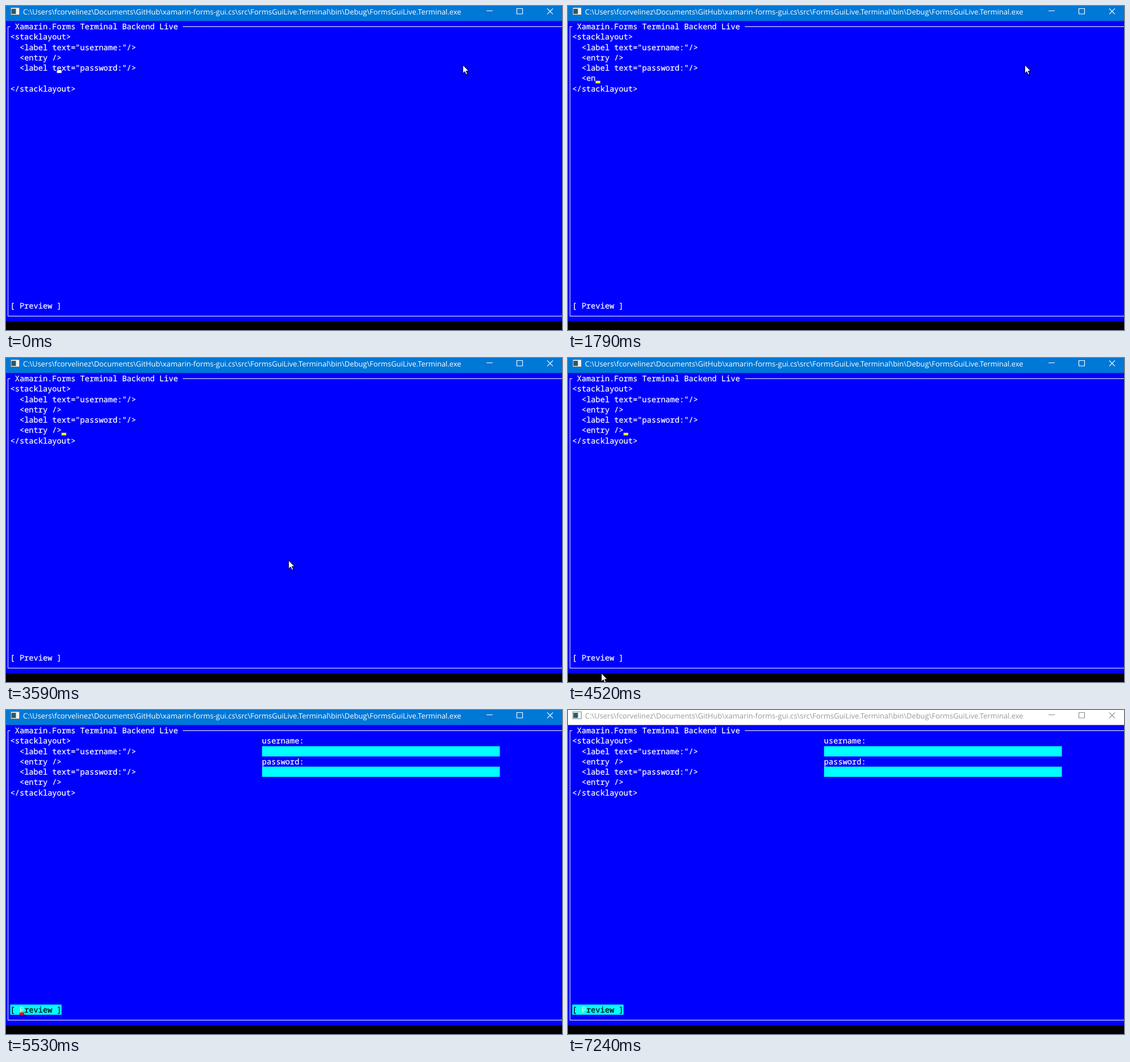
Animation, 979 px wide and 572 px high, one loop 7.96 s. Source, as an HTML page:

```html
<!DOCTYPE html>
<html lang="en">
<head>
<meta charset="utf-8">
<title>Terminal live preview</title>
<style>
  html, body { margin: 0; width: 100%; height: 100%; overflow: hidden; background: #000; }
  svg { display: block; width: 979px; height: 572px; }
  text { white-space: pre; text-rendering: geometricPrecision; }
  .mono { font: 13.68px "Noto Sans Mono", "DejaVu Sans Mono", monospace; stroke-width: .25px; }
  .caption { font: 12.91px "Open Sans", "Noto Sans", sans-serif; }
</style>
</head>
<body>
<svg id="stage" viewBox="0 0 979 572"></svg>
<script>
const LOOP = 7960;
const CELL = 8.21, LINE = 18.27, LEFT = -0.7, TOP = 27;
const colX = col => LEFT + CELL * col;
const rowY = row => TOP + LINE * row;

const stage = document.getElementById('stage');

function add(tag, attrs, parent = stage) {
  const el = document.createElementNS('http://www.w3.org/2000/svg', tag);
  for (const name in attrs) el.setAttribute(name, attrs[name]);
  parent.appendChild(el);
  return el;
}
const rect = (x, y, width, height, fill, parent) => add('rect', { x, y, width, height, fill }, parent);

function print(col, row, string, fill = '#fff', parent = stage) {
  const el = add('text', { x: colX(col), y: rowY(row) + 14, fill, stroke: fill, class: 'mono' }, parent);
  el.textContent = string;
  return el;
}
const cells = (col, row, count, fill, parent) =>
  rect(colX(col), Math.round(rowY(row)), CELL * count, 18, fill, parent);
const show = (el, on) => el.setAttribute('visibility', on ? 'visible' : 'hidden');

// Window caption
const bar = rect(0, 0, 979, 27, '#0078d7');
const icon = add('g', {});
rect(8, 2.5, 16, 13.5, '#7d868c', icon);
rect(9, 3.5, 14, 11.5, '#f4f6f7', icon);
rect(9.5, 5, 8, 9, '#245e68', icon);
const caption = add('text', { x: 30, y: 14.7, class: 'caption' });
caption.textContent = 'C:\\Users\\fcorvelinez\\Documents\\GitHub\\xamarin-forms-gui.cs\\src\\' +
  'FormsGuiLive.Terminal\\bin\\Debug\\FormsGuiLive.Terminal.exe';
const buttons = add('path', {
  d: 'M846 8.5h11M899.5 4.5h10v9.5h-10zM953 4.3l10 10M963 4.3l-10 10', fill: 'none', 'stroke-width': 1.15
});

// Console window and its frame
rect(0, 26.5, 979, 530, '#00f');
rect(3, 36, 1, 512, '#fff');
rect(3, 36, 4.5, 1, '#fff');
rect(colX(38), 36, 979, 1, '#fff');
rect(3, 547, 979, 1, '#fff');
print(2, 0, 'Xamarin.Forms Terminal Backend Live');

// Editor
print(1, 1, '<stacklayout>');
print(3, 2, '<label text="username:"/>');
print(3, 3, '<entry />');
print(3, 4, '<label text="password:"/>');
const typed = print(3, 5, '');
print(1, 6, '</stacklayout>');

// Preview button, plain and focused
const plainButton = print(1, 27, '[ Preview ]');
const focusedButton = add('g', {});
cells(1, 27, 11, '#0ff', focusedButton);
print(1, 27, '[', '#000', focusedButton);
print(3, 27, 'P', '#ffff99', focusedButton);
print(4, 27, 'review ]', '#000', focusedButton);

// Rendered form
const form = add('g', {});
['username:', 'password:'].forEach((label, i) => {
  print(55, 1 + 2 * i, label, '#fff', form);
  cells(55, 2 + 2 * i, 51, '#0ff', form);
});

const caret = rect(0, 0, CELL, 4.5, '#fff');
const pointer = add('path', {
  d: 'M.5 .7V15.3L3.9 12.2 6.2 17.5 8.5 16.5 6.2 11.3H10.7Z',
  fill: '#fff', stroke: '#000', 'stroke-width': .9
});

const NEW_LINE = 620, FOCUS = 4990, RENDER = 5530, BLUR = 7240;
const clamp = u => Math.min(1, Math.max(0, u));
const easeOut = u => 1 - (1 - u) ** 2;

// A slow first key, a quick burst, then a steady finish.
function typedCount(t) {
  const part = (from, to, keys) => Math.floor(clamp((t - from) / (to - from)) * keys);
  return part(0, 1000, 1) + part(1000, 1650, 1) + part(1650, 2020, 4) + part(2020, 2720, 3);
}

// The caret flips between shown and hidden at each of these times.
const blinks = [460, NEW_LINE, 3120, 3590, 5230, RENDER, 5760, 6310, BLUR];
const caretShown = t => blinks.filter(time => time <= t).length % 2 === 0;

function caretCell(t) {
  if (t < NEW_LINE) return [t < 80 ? 11 : 12, 4, '#fff'];
  if (t < FOCUS) return [3 + typedCount(t), 5, '#ff0'];
  return [3, 27, '#f00'];
}

// Each sweep is a quadratic curve: start, control, end.
const sweeps = [
  { from: 3280, to: 3750, x: [804, 611, 461], y: [103.5, 302, 376] },
  { from: 4050, to: 4840, x: [461, 51, 44], y: [376, 531, 574] },
  { from: 6690, to: 7090, x: [806, 868, 926], y: [574, 540, 575] }
];
const SAMPLE = 77;
const curve = ([a, b, c], e) => a * (1 - e) ** 2 + 2 * b * e * (1 - e) + c * e * e;

function pointerAt(t) {
  const { from, to, x, y } = sweeps.findLast(sweep => sweep.from <= t) || sweeps[0];
  const elapsed = t < to ? Math.floor((t - from) / SAMPLE) * SAMPLE : to - from;
  const e = easeOut(clamp(elapsed / (to - from)));
  return [curve(x, e), curve(y, e)];
}

function draw(t) {
  const active = t < BLUR;
  bar.setAttribute('fill', active ? '#0078d7' : '#fff');
  caption.setAttribute('fill', active ? '#fff' : '#999');
  buttons.setAttribute('stroke', active ? '#fff' : '#8c8c8c');

  typed.textContent = '<entry />'.slice(0, typedCount(t));
  show(plainButton, t < FOCUS);
  show(focusedButton, t >= FOCUS);
  show(form, t >= RENDER);

  const [col, row, color] = caretCell(t);
  show(caret, caretShown(t));
  caret.setAttribute('x', colX(col));
  caret.setAttribute('y', rowY(row) + 13.7);
  caret.setAttribute('fill', color);

  pointer.setAttribute('transform', `translate(${pointerAt(t)})`);
}

const start = performance.now();
function tick() {
  draw((performance.now() - start) % LOOP);
  requestAnimationFrame(tick);
}
tick();
</script>
</body>
</html>
```
